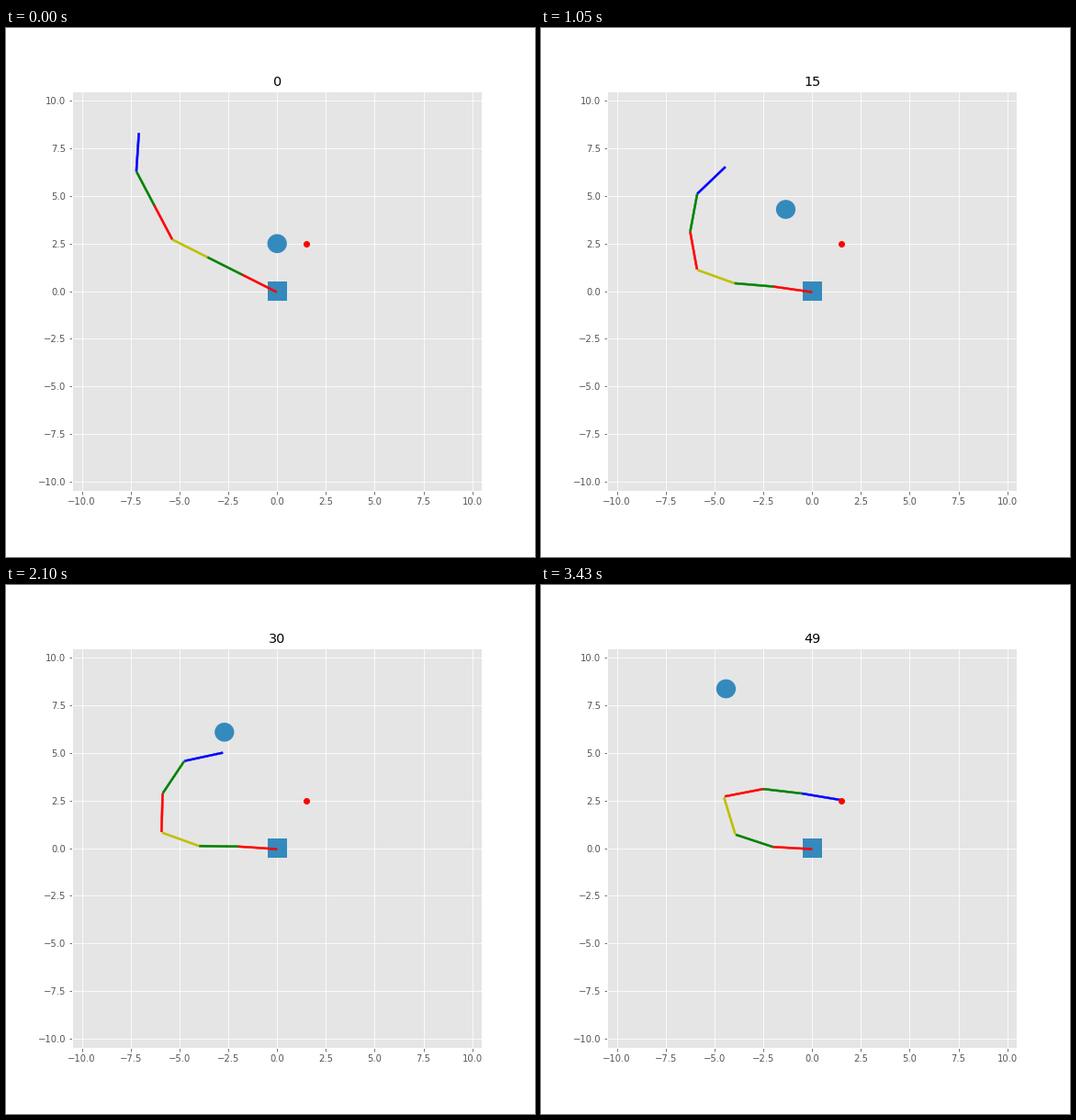
These frames come from a looping animation (576 px wide and 576 px high, 3500 ms). A matplotlib script:

```python
import numpy as np
import matplotlib.pyplot as plt
from matplotlib.animation import FuncAnimation
from matplotlib.patches import Circle, Rectangle

FRAMES, INTERVAL = 50, 70
LINK_LENGTH, LINK_WIDTH = 2, 0.1

# Key poses: base angle, then the bend at each following joint, in degrees.
KEY_TIMES = np.array([0, 19, 34, 49])
KEY_BENDS = np.array([
    [152.7, 0, 0, -35.5, 0, -30.9],
    [174, 3.3, -18, -64.5, -24, -36.7],
    [178.2, 2.6, -22, -74.8, -32.5, -43.5],
    [176.7, -15.4, -54.7, -95.4, -18, -3],
])
SLOPES = np.gradient(KEY_BENDS, KEY_TIMES, axis=0, edge_order=2)


def joint_positions(bends):
    angles = np.radians(np.cumsum(bends))
    steps = LINK_LENGTH * np.column_stack([np.cos(angles), np.sin(angles)])
    return np.vstack([np.zeros(2), np.cumsum(steps, axis=0)])


KEY_TIPS = np.array([joint_positions(bends)[-1] for bends in KEY_BENDS])


def eased_bends(t):
    """Cubic Hermite interpolation between the key poses."""
    k = min(np.searchsorted(KEY_TIMES, t, side="right"), len(KEY_TIMES) - 1) - 1
    span = KEY_TIMES[k + 1] - KEY_TIMES[k]
    u = (t - KEY_TIMES[k]) / span
    ease = u * u * (3 - 2 * u)
    return (KEY_BENDS[k] * (1 - ease) + KEY_BENDS[k + 1] * ease
            + span * u * (1 - u) * (SLOPES[k] * (1 - u) - SLOPES[k + 1] * u))


def solve_arm(t):
    """Bend the arm so that its tip runs along straight legs at even speed."""
    goal = np.array([np.interp(t, KEY_TIMES, axis) for axis in KEY_TIPS.T])
    bends = eased_bends(t)
    for _ in range(4):
        joints = joint_positions(bends)
        reach = joints[-1] - joints[:-1]
        jacobian = np.array([-reach[:, 1], reach[:, 0]])
        bends = bends + np.degrees(np.linalg.pinv(jacobian) @ (goal - joints[-1]))
    return bends


plt.style.use("ggplot")
fig, ax = plt.subplots(figsize=(8, 8), dpi=72)
fig.subplots_adjust(left=0.125, right=0.9, bottom=0.125, top=0.88)
ax.set(xlim=(-10.5, 10.5), ylim=(-10.5, 10.5))
ticks = np.arange(-10, 10.1, 2.5)
ax.set_xticks(ticks)
ax.set_yticks(ticks)
title = ax.set_title("0")

ax.add_patch(Rectangle((-0.5, -0.5), 1, 1))
obstacle = ax.add_patch(Circle((0, 2.5), 0.5))
ax.plot(1.5, 2.5, "ro")
links = [ax.add_patch(Rectangle((0, 0), LINK_LENGTH, LINK_WIDTH, color=c))
         for c in "rgyrgb"]


def update(i):
    title.set_text(str(i))
    obstacle.center = (-0.09 * i, 2.5 + 0.12 * i)
    bends = solve_arm(i)
    for link, joint, angle in zip(links, joint_positions(bends), np.cumsum(bends)):
        link.set_xy(joint)
        link.set_angle(angle)
    return [title, obstacle, *links]


anim = FuncAnimation(fig, update, frames=FRAMES, interval=INTERVAL,
                     repeat=True, repeat_delay=0)
plt.show()
```
